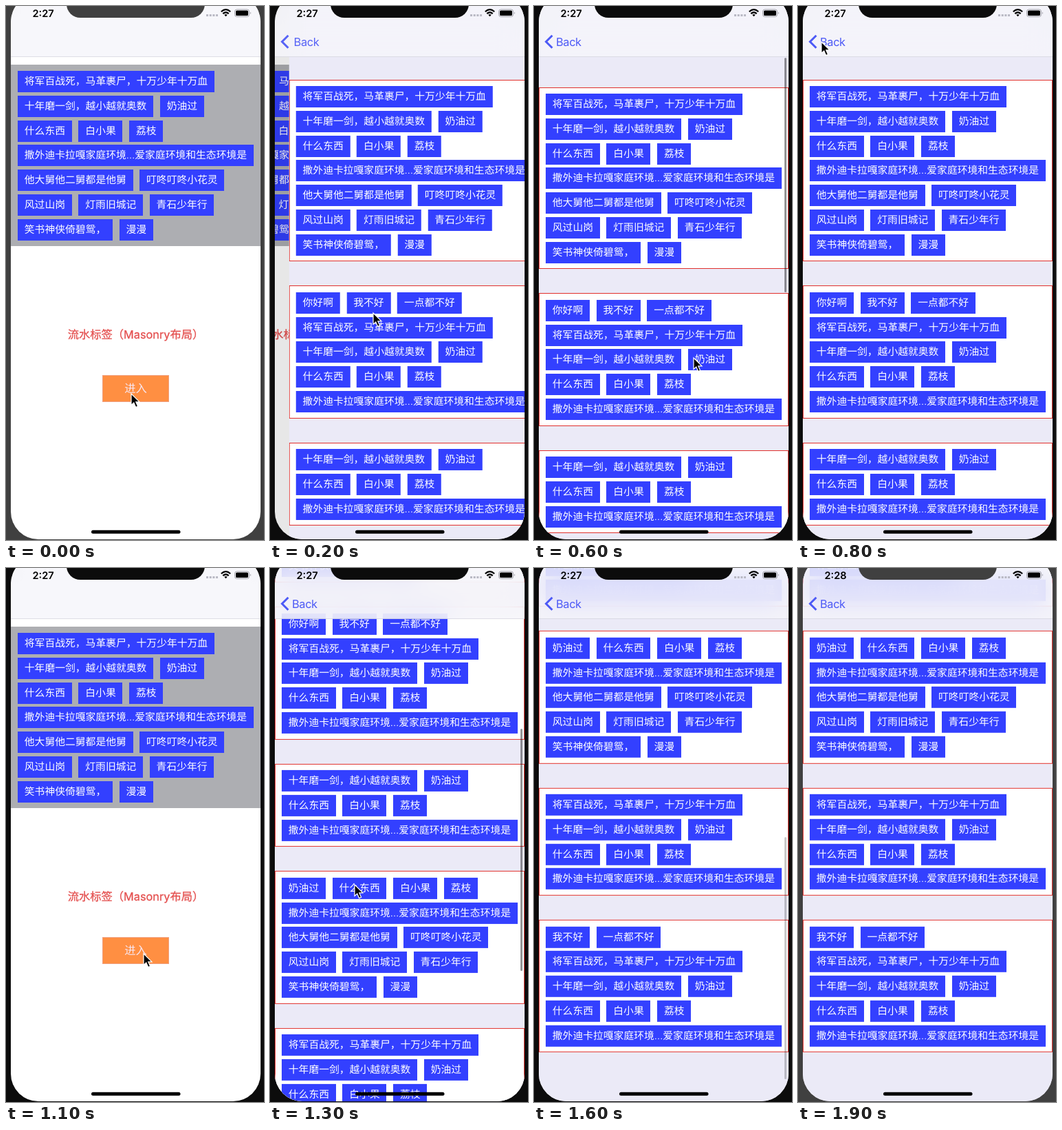
Write an HTML page that moves like this. It is 375 by 774 pixels and loops after 2000 ms.

```html
<!DOCTYPE html>
<html lang="zh-CN">
<head>
<meta charset="utf-8">
<style>
  html, body { margin: 0; width: 100%; height: 100%; overflow: hidden; }
  body {
    position: relative; color: #000;
    font: 14.8px Inter, "Noto Sans CJK SC", "Noto Sans CJK", sans-serif;
    text-rendering: geometricPrecision; white-space: nowrap;
  }
  #screen, #screen > div, #chrome { position: absolute; left: 0; top: 0; width: 375px; height: 774px; }
  #screen { background: #fff; clip-path: inset(-17px 5px 1px 7px round 40px); }
  #screen > #list { left: 7px; width: 368px; background: #ebeaf7; overflow: hidden; }
  #sections { position: absolute; left: 0; top: 106.6px; }
  #dim { background: #000; }
  #screen > #nav {
    height: 72.5px; background: rgba(246, 246, 251, .82);
    border-bottom: 1px solid rgba(0, 0, 40, .1); backdrop-filter: blur(18px);
  }
  .tags {
    box-sizing: border-box; width: 363px; padding: 8.5px 9px 7.75px; margin-bottom: 35px;
    display: flex; flex-wrap: wrap; gap: 4.75px 9.7px;
    background: #fff; border: 1px solid #e0302c;
  }
  .tags span {
    height: 31px; line-height: 30px; padding: 0 9.8px;
    background: #3340ff; color: #fff; font-weight: 300;
  }
  #home .tags { position: absolute; left: 7px; top: 84.5px; background: #adaeb2; border-color: #adaeb2; }
  #home p { position: absolute; margin: 0; text-align: center; font-size: 16.3px; }
  #title { left: 7px; width: 363px; top: 464px; line-height: 25px; color: #e4504f; -webkit-text-stroke: .3px; }
  #enter {
    box-sizing: border-box; left: 140px; top: 535px; width: 97px; height: 39px; line-height: 37px;
    background: #ff8f42; border: 1px solid #f0a080; color: #f8e6f0; font-weight: 300;
  }
  #bar { position: absolute; left: 357px; width: 2.6px; border-radius: 2px; background: rgba(0, 0, 0, .42); }
  #chrome text { font-family: Inter, sans-serif; }
</style>
</head>
<body>
<div id="screen">
  <div id="home">
    <p id="title">流水标签（Masonry布局）</p>
    <p id="enter">进入</p>
  </div>
  <div id="dim"></div>
  <div id="list"><div id="sections"></div><i id="bar"></i></div>
  <div id="nav"></div>
</div>
<svg id="chrome" viewBox="0 0 375 774">
  <path id="notch" d="M88 -3A20 20 0 0 0 108 17H269A20 20 0 0 0 289 -3Z"/>
  <text id="clock" x="38.5" y="15.5" font-size="14.6" font-weight="600"></text>
  <path d="M291 13.5H308" stroke="#b9b9c4" stroke-width="3" stroke-dasharray="3 1.7"/>
  <g fill="none" stroke="#000" stroke-width="2.2">
    <path d="M312.8 8.2Q319.5 2.2 326.2 8.2M315.3 11.1Q319.5 7.4 323.7 11.1"/>
    <path d="M317.3 12.8Q319.5 11 321.7 12.8L319.5 15.2Z" fill="#000" stroke="none"/>
  </g>
  <rect x="332.5" y="5" width="21" height="10.5" rx="3" fill="none" stroke="#a0a0a8"/>
  <rect x="334" y="6.5" width="18" height="7.5" rx="1.6"/>
  <path d="M355 8.5Q357 10.2 355 12Z" fill="#a0a0a8"/>
  <g id="back">
    <path d="M26.5 42.8L17.5 51.8L26.5 60.8" fill="none" stroke="#4d5af6" stroke-width="3"/>
    <text id="backLabel" x="32" y="57.5" font-size="16.4" letter-spacing="-.4" fill="#4d5af6">Back</text>
  </g>
  <rect x="124" y="759.8" width="129.5" height="5" rx="2.5"/>
  <path id="cursor" d="M0 0V16.5L3.8 13L6.6 19.6L9.6 18.3L6.8 11.9H12Z" stroke="#fff" stroke-width="1.2"/>
</svg>
<script>
const $ = id => document.getElementById(id);

const words = ["你好啊", "我不好", "一点都不好", "将军百战死，马革裹尸，十万少年十万血",
  "十年磨一剑，越小越就奥数", "奶油过", "什么东西", "白小果", "荔枝",
  "撒外迪卡拉嘎家庭环境…爱家庭环境和生态环境是", "他大舅他二舅都是他舅", "叮咚叮咚小花灵",
  "风过山岗", "灯雨旧城记", "青石少年行", "笑书神侠倚碧鸳，", "漫漫"];

// One box holding the run of tags from the first word to the last
function addTags(parent, first, last) {
  const box = document.createElement("div");
  box.className = "tags";
  for (const word of words.slice(words.indexOf(first), words.indexOf(last) + 1)) {
    const tag = document.createElement("span");
    tag.textContent = word;
    box.append(tag);
  }
  parent.append(box);
}
const longest = words[9], end = "漫漫";
addTags($("home"), words[3], end);
addTags($("sections"), words[3], end);
addTags($("sections"), "你好啊", longest);
addTags($("sections"), words[4], longest);
addTags($("sections"), "奶油过", end);
addTags($("sections"), words[3], longest);
addTags($("sections"), "我不好", longest);

// Smooth step from 0 to 1 while time runs from start to stop
function ramp(t, start, stop) {
  const k = Math.min(Math.max((t - start) / (stop - start), 0), 1);
  return k * k * (3 - 2 * k);
}

const WIDTH = 363, END = 697.2, OVER_BOTTOM = 23, OVER_TOP = 11;
const BAR_TOP = 75, BAR_BOTTOM = 741, BAR_LENGTH = 351;

const pushAt = t => ramp(t, 100, 217) - ramp(t, 800, 1000) + ramp(t, 1100, 1217);

// First visit: flick down past the end, flick back past the top, settle. Second visit: stop at the end.
function scrollAt(t) {
  const up = ramp(t, 400, 600);
  return (END + OVER_BOTTOM) * (ramp(t, 200, 400) - up)
    - OVER_TOP * (up - ramp(t, 600, 700))
    + (END + 1) * ramp(t, 1200, 1400) - ramp(t, 1400, 1500);
}

const barOpacityAt = t =>
  ramp(t, 200, 300) - ramp(t, 600, 800) + ramp(t, 1200, 1300) - ramp(t, 1500, 1700);

// Pointer stops: button, list flicks, back link, button, list, off stage
const stops = [
  { at: 0, x: 182, y: 562 }, { at: 200, x: 150, y: 445 }, { at: 400, x: 247, y: 352 },
  { at: 600, x: 232, y: 510 }, { at: 800, x: 34, y: 52 }, { at: 1100, x: 200, y: 559 },
  { at: 1400, x: 96, y: 424 }, { at: 1600, x: 60, y: 800 }
];
function pointerAt(t) {
  let { x, y } = stops[0];
  for (let i = 1; i < stops.length; i++) {
    const from = stops[i - 1], to = stops[i], k = ramp(t, from.at, to.at);
    x += (to.x - from.x) * k;
    y += (to.y - from.y) * k;
  }
  return `translate(${x} ${y})`;
}

function draw(t) {
  const push = pushAt(t), scroll = scrollAt(t);
  $("home").style.transform = `translateX(${-.3 * WIDTH * push}px)`;
  $("dim").style.opacity = .1 * push;
  $("list").style.transform = `translateX(${WIDTH * (1 - push)}px)`;
  $("sections").style.transform = `translateY(${-scroll}px)`;

  const inside = Math.min(Math.max(scroll, 0), END);
  const length = BAR_LENGTH - Math.abs(scroll - inside);
  const bar = $("bar").style;
  bar.top = BAR_TOP + (BAR_BOTTOM - BAR_TOP - length) * inside / END + "px";
  bar.height = length + "px";
  bar.opacity = barOpacityAt(t);

  $("back").style.opacity = push;
  $("backLabel").setAttribute("x", 32 + 45 * (1 - push));
  $("cursor").setAttribute("transform", pointerAt(t));
  $("clock").textContent = t < 1700 ? "2:27" : "2:28";
  const bezel = t < 100 || t >= 1700 ? "#404040" : "#0c0c0c";
  document.body.style.background = bezel;
  $("notch").setAttribute("fill", bezel);
}

// The picture advances in steps of 100 ms
function tick() {
  draw(Math.floor(performance.now() % 2000 / 100) * 100);
  requestAnimationFrame(tick);
}
tick();
</script>
</body>
</html>
```
